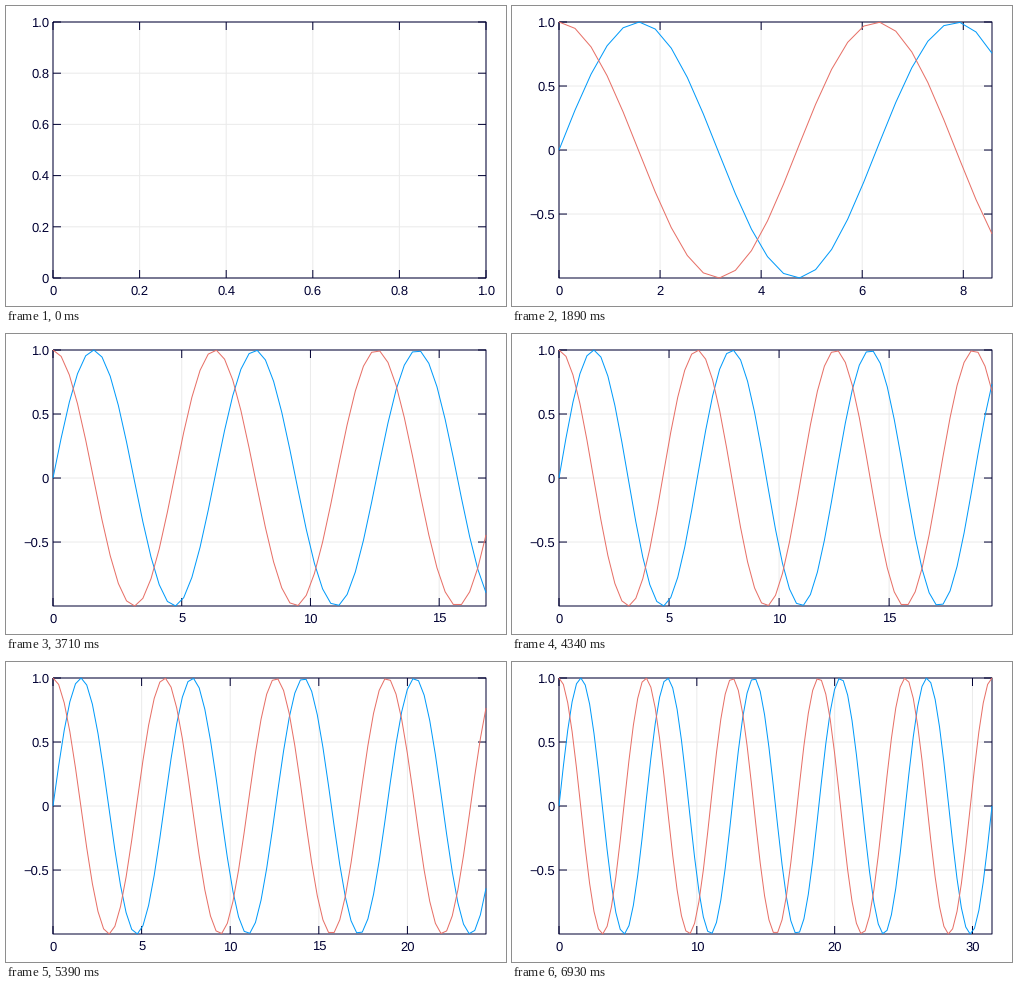
Animation, 500 px wide and 300 px high, one loop 7 s. Source, as a matplotlib script:

```python
import math

import numpy as np
import matplotlib.pyplot as plt
from matplotlib.animation import FuncAnimation
from matplotlib.collections import LineCollection

W, H, DPI = 500, 300, 100
FRAMES, INTERVAL = 100, 70
LEFT, RIGHT, TOP, BOTTOM = 47, 480, 16, 272
TICK = 8
PX = 72 / DPI

INK = "#000033"
GRID = "#ebebeb"
BLUE = "#009afa"
RED = "#e76f66"

plt.rcParams["font.family"] = "Liberation Sans"
plt.rcParams["text.hinting"] = "none"
plt.rcParams["path.snap"] = False

xs = np.linspace(0, 10 * math.pi, FRAMES)
sines, cosines = np.sin(xs), np.cos(xs)

fig = plt.figure(figsize=(W / DPI, H / DPI), dpi=DPI, facecolor="white")
ax = fig.add_axes([0, 0, 1, 1])


def tick_step(span):
    exponent = math.log10(span)
    power = math.floor(exponent)
    factor = 10 ** (exponent - power)
    if factor > 5:
        unit = 2
    elif factor > 2.5:
        unit = 1
    elif factor > 1:
        unit = 0.5
    else:
        unit = 0.2
    return unit * 10.0 ** power


def ticks(low, high):
    """Return (value, label) pairs inside the range."""
    step = tick_step(high - low)
    first = math.ceil(low / step - 1e-9)
    last = math.floor(high / step + 1e-9)
    digits = 1 if step < 1 else 0
    pairs = []
    for i in range(first, last + 1):
        label = f"{i * step:.{digits}f}".replace("-", "\u2212") if i else "0"
        pairs.append((i * step, label))
    return pairs


def add_segments(segments, color):
    ax.add_collection(LineCollection(segments, colors=color, linewidths=PX,
                                     capstyle="butt", clip_on=False))


def add_label(x, y, text, align):
    ax.text(x, y, text, ha=align, va="baseline", color=INK, fontsize=13 * PX)


def draw(frame):
    ax.clear()
    ax.set_xlim(0, W)
    ax.set_ylim(H, 0)
    ax.axis("off")

    n = frame + 1
    x_max = xs[frame] if frame else 1.0
    y_min = min(sines[:n].min(), cosines[:n].min())
    y_max = max(sines[:n].max(), cosines[:n].max())

    def to_x(x):
        return LEFT + (RIGHT - LEFT) * x / x_max

    def to_y(y):
        return BOTTOM - (BOTTOM - TOP) * (y - y_min) / (y_max - y_min)

    grid, marks = [], []
    for value, label in ticks(0, x_max):
        x = to_x(value)
        grid.append([(x, TOP), (x, BOTTOM)])
        marks.append([(x, TOP), (x, TOP + TICK)])
        marks.append([(x, BOTTOM), (x, BOTTOM - TICK)])
        add_label(x, 288.6, label, "center")
    for value, label in ticks(y_min, y_max):
        y = to_y(value)
        grid.append([(LEFT, y), (RIGHT, y)])
        marks.append([(LEFT, y), (LEFT + TICK, y)])
        marks.append([(RIGHT, y), (RIGHT - TICK, y)])
        add_label(43.2, y + 4.6, label, "right")

    add_segments(grid, GRID)
    box = [(LEFT, TOP), (RIGHT, TOP), (RIGHT, BOTTOM), (LEFT, BOTTOM), (LEFT, TOP)]
    add_segments([box] + marks, INK)

    if frame:
        for ys, color in ((sines, BLUE), (cosines, RED)):
            ax.plot(to_x(xs[:n]), to_y(ys[:n]), color=color, lw=PX,
                    solid_capstyle="butt", solid_joinstyle="round", clip_on=False)
    return []


anim = FuncAnimation(fig, draw, frames=FRAMES, interval=INTERVAL,
                     init_func=lambda: draw(0), repeat=True, repeat_delay=0)
plt.show()
```
